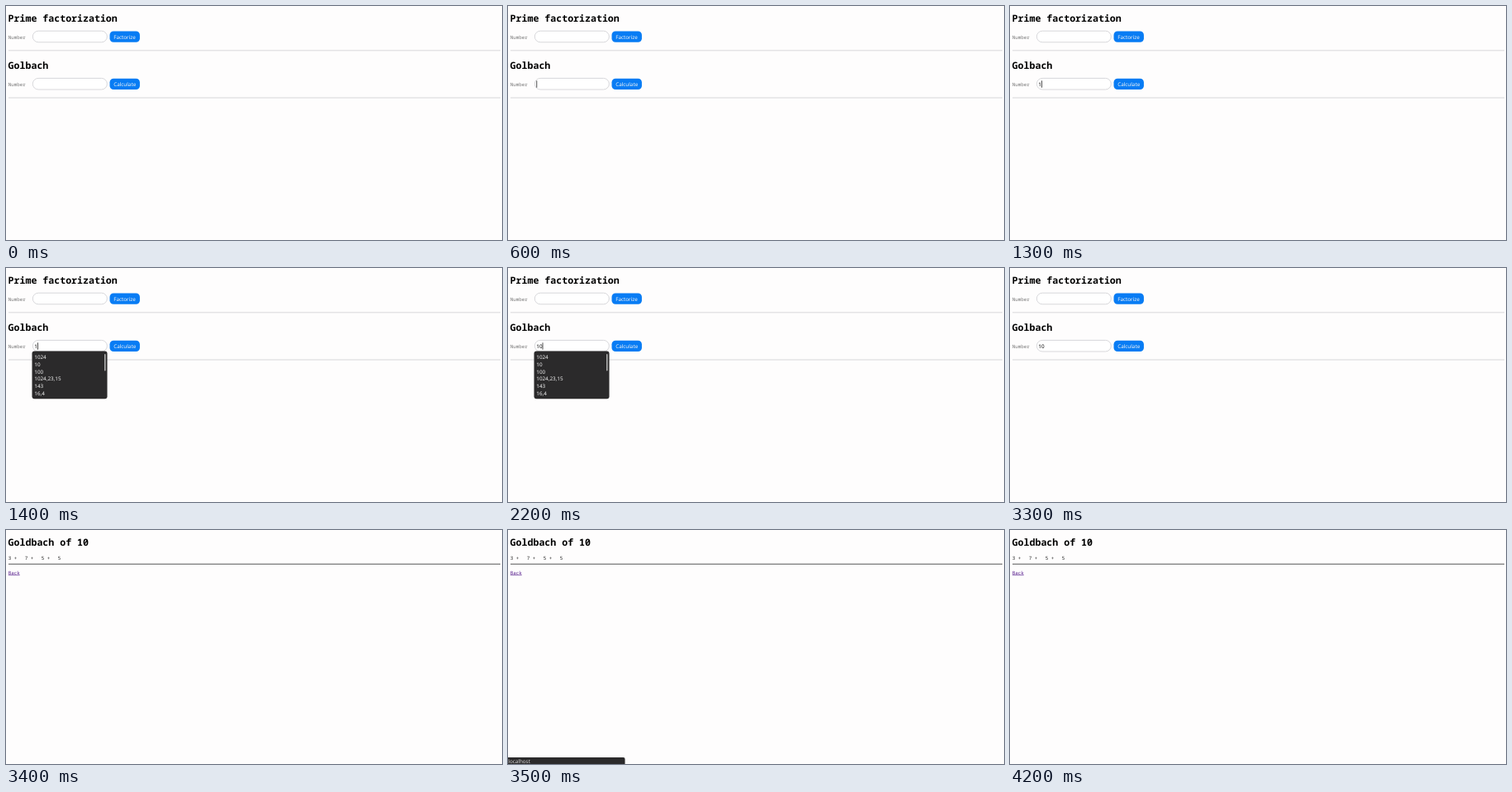
An HTML page for the animation above (5400 ms loop, 600x283 px).

```html
<!DOCTYPE html>
<html lang="en">
<head>
<meta charset="utf-8">
<title>Number forms</title>
<style>
  html, body { margin: 0; width: 100%; height: 100%; overflow: hidden; background: #fefdfd; }
  svg { display: block; width: 600px; height: 283px; }
  text { font: 6.3px "Noto Sans", sans-serif; text-rendering: geometricPrecision; white-space: pre; }
  .mono { font: 5.8px "Noto Sans Mono", monospace; fill: #222; }
  .label { fill: #777; }
  .title { font: bold 11.6px "Noto Sans Mono", monospace; fill: #000; }
  .link { fill: #551a8b; text-decoration: underline; }
  .light { fill: #f4f4f4; }
  .field { fill: #fff; stroke: #cfcfd2; stroke-width: .8; }
  .button { fill: #087cf4; }
  .panel { fill: #2b2a2b; }
</style>
</head>
<body>
<svg id="stage" viewBox="0 0 600 283" xmlns="http://www.w3.org/2000/svg"></svg>
<script>
const stage = document.getElementById('stage');
const LOOP = 5400;

function add(parent, tag, attrs = {}, content = '') {
  const el = document.createElementNS('http://www.w3.org/2000/svg', tag);
  for (const key in attrs) el.setAttribute(key, attrs[key]);
  el.textContent = content;
  parent.append(el);
  return el;
}
const group = () => add(stage, 'g');
const text = (parent, x, y, content, cls = '') =>
  add(parent, 'text', { x, y, class: cls }, content);
const rect = (parent, x, y, width, height, attrs) =>
  add(parent, 'rect', { x, y, width, height, ...attrs });
const show = (el, on) => { el.style.display = on ? '' : 'none'; };

function form(parent, top, title, action) {
  text(parent, 2.6, top + 19, title, 'title');
  text(parent, 2.8, top + 39.9, 'Number', 'mono label');
  rect(parent, 32.3, top + 30.2, 90, 13.6, { rx: 6.8, class: 'field' });
  rect(parent, 125.5, top + 30.5, 36.4, 13.3, { rx: 4.6, class: 'button' });
  text(parent, 130.2, top + 39.7, action, 'light');
  rect(parent, 3, top + 53.2, 595, 1.2, { fill: '#dedee0' });
}

function list(rows, scrollable) {
  const g = group();
  rect(g, 31.5, 100.5, 91, rows.length * 8.85 + 4.6, { rx: 3, class: 'panel' });
  rows.forEach((row, i) => text(g, 34.3, 109.8 + i * 8.85, row, 'light'));
  if (scrollable) rect(g, 119.1, 104, 1.4, 20.5, { rx: .7, fill: '#c4c4c4' });
  return g;
}

const formPage = group();
form(formPage, 0, 'Prime factorization', 'Factorize');
form(formPage, 57.2, 'Golbach', 'Calculate');
const typed = text(formPage, 34.3, 96.9, '');
const caret = rect(formPage, 0, 90.3, .8, 8.4, { fill: '#222' });

const lists = {
  long: list(['1024', '10', '100', '1024,23,15', '143', '16,4'], true),
  short: list(['1024', '10', '1024,23,15', '100', '1024,85,78,32'], false)
};

const resultPage = group();
text(resultPage, 2.6, 19, 'Goldbach of 10', 'title');
['3 +', '7 +', '5 +', '5'].forEach((part, i) =>
  text(resultPage, 2.8 + i * 20, 36.1, part, 'mono'));
rect(resultPage, 3, 40.7, 595, 1, { fill: '#555' });
text(resultPage, 2.8, 53.5, 'Back', 'mono link');

const status = group();
add(status, 'path', { d: 'M0 275H139.5Q141.5 275 141.5 277V283H0Z', class: 'panel' });
text(status, .3, 282.3, 'localhost').setAttribute('fill', '#d8d8d8');

// Each step lists only what changes.
const steps = [
  { at: 0, value: '', caret: false, list: '', result: false, status: false },
  { at: 600, caret: true },
  { at: 1300, value: '1' },
  { at: 1400, list: 'long' },
  { at: 1800, caret: false },
  { at: 2200, value: '10', caret: true },
  { at: 2300, list: 'short' },
  { at: 3000, caret: false },
  { at: 3300, list: '' },
  { at: 3400, result: true },
  { at: 3500, status: true },
  { at: 3600, status: false }
];

function render(time) {
  const s = Object.assign({}, ...steps.filter(step => step.at <= time));
  show(formPage, !s.result);
  show(resultPage, s.result);
  show(status, s.status);
  show(caret, s.caret);
  for (const name in lists) show(lists[name], s.list === name);
  typed.textContent = s.value;
  caret.setAttribute('x', 34.4 + s.value.length * 3.6);
}

const start = performance.now();
function tick() {
  render((performance.now() - start) % LOOP);
  requestAnimationFrame(tick);
}
tick();
</script>
</body>
</html>
```
